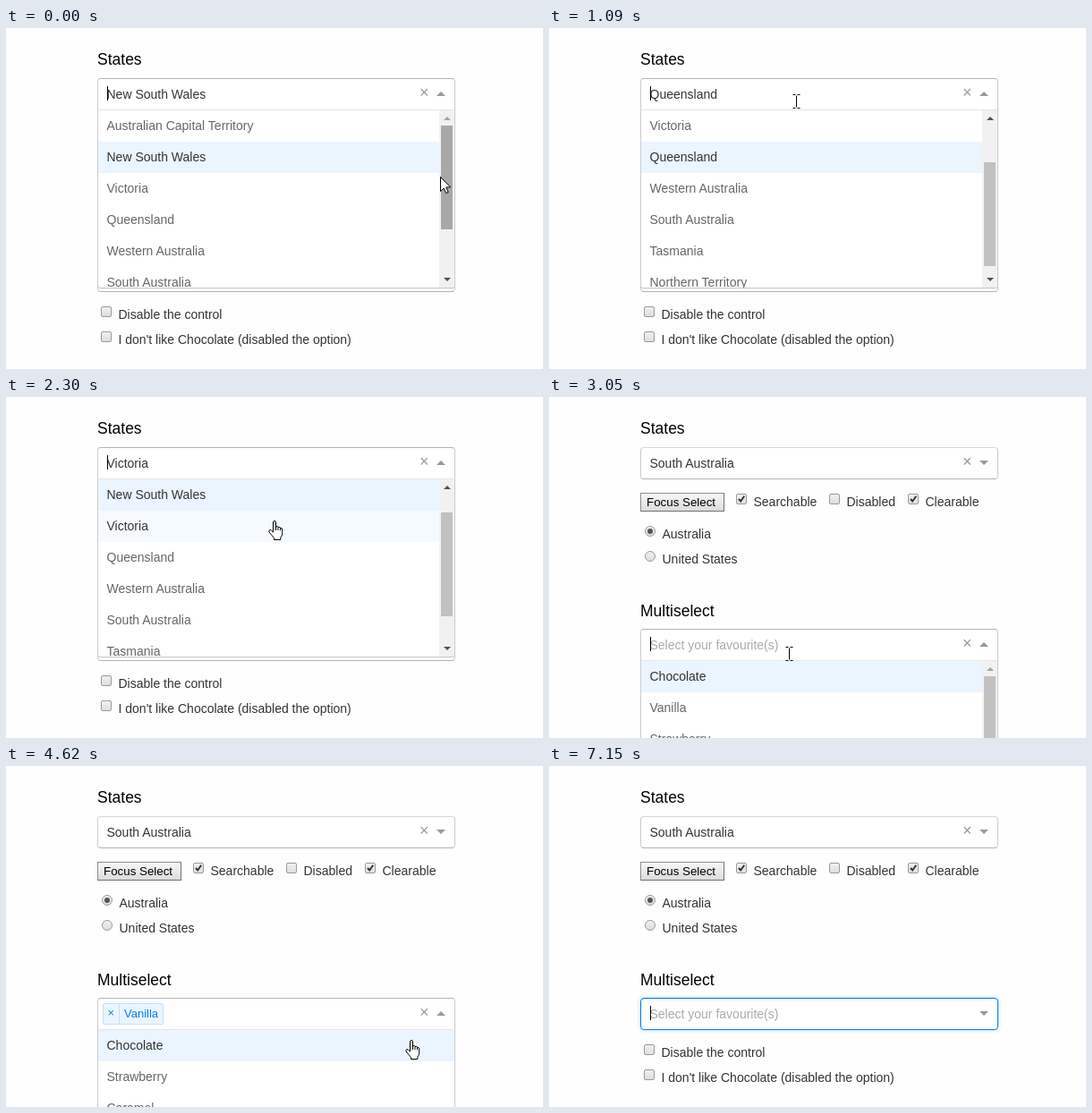
Recreate the animation shown at these times as an HTML page. Size 600 by 381 pixels, loop 7.25 s.

```html
<!DOCTYPE html>
<html lang="en">
<head>
<meta charset="utf-8">
<title>Select controls</title>
<style>
html, body { margin: 0; width: 100%; height: 100%; overflow: hidden; background: #fefefe; }
#stage { position: relative; width: 600px; height: 381px; overflow: hidden;
  font-family: "Liberation Sans", Arial, sans-serif; }
#stage div, #stage svg { position: absolute; box-sizing: border-box; }
.text { white-space: pre; }
.control { left: 102px; width: 400px; height: 36px; background: #fff; border: 1px solid;
  border-color: #d9d9d9 #ccc #b3b3b3; border-radius: 4px; }
.control.open { border-color: #b3b3b3 #ccc #d9d9d9; border-radius: 4px 4px 0 0; }
.control.focus { border-color: #007eff;
  box-shadow: inset 0 1px 2px rgba(0,0,0,.1), 0 0 5px -1px rgba(0,126,255,.5); }
.menu { left: 102px; width: 400px; height: 200px; background: #fff; border: 1px solid #ccc;
  border-top-color: #e6e6e6; border-radius: 0 0 4px 4px; overflow: hidden;
  box-shadow: 0 1px 0 rgba(0,0,0,.06); }
.row { left: 0; width: 398px; height: 35px; }
.bar { left: 381px; top: 0; width: 17px; height: 198px; background: #f1f1f1; }
.thumb { left: 2px; width: 13px; }
.caret { width: 1px; height: 16px; background: #000; }
.tag { top: 265px; height: 24px; background: #ebf5ff; border: 1px solid #c2e0ff; border-radius: 2px; }
.tag div { left: 17px; top: 0; width: 1px; height: 22px; background: #c2e0ff; }
.button { left: 102px; top: 107px; width: 94px; height: 21px; border: 1px solid;
  border-color: #8c8c8c #707070 #707070 #8c8c8c; background: linear-gradient(#f7f7f7, #dcdcdc); }
.box { width: 12px; height: 12px; border: 1px solid #9a9a9a; border-radius: 2px;
  background: linear-gradient(#f0f0f0, #dedede); }
.box.round { border-radius: 50%; }
.dot { left: 2px; top: 2px; width: 6px; height: 6px; border-radius: 50%; background: #555; }
</style>
</head>
<body>
<div id="stage"></div>
<script>
const LOOP = 7250;
const STATES = ['Australian Capital Territory', 'New South Wales', 'Victoria', 'Queensland',
  'Western Australia', 'South Australia', 'Tasmania', 'Northern Territory'];
const FLAVOURS = ['Chocolate', 'Vanilla', 'Strawberry', 'Caramel', 'Cookies and Cream', 'Peppermint'];
const TAG_WIDTH = { Vanilla: 68, Chocolate: 89 };

const SCENES = {
  start: { open: 'states', value: 1, scroll: 0 },
  queensland: { focus: 'states', value: 3 },
  second: { open: 'states', value: 3, scroll: 70 },
  victoria: { focus: 'states', value: 2 },
  third: { open: 'states', value: 2, scroll: 35 },
  south: { focus: 'states', value: 5 },
  multi: { open: 'multi', value: 5 },
  one: { open: 'multi', value: 5, tags: ['Vanilla'] },
  two: { open: 'multi', value: 5, tags: ['Vanilla', 'Chocolate'] },
  cleared: { focus: 'multi', value: 5, empty: true }
};

// time, scene, highlighted option, caret shown, pointer, x, y, hovered part
const STEPS = [
  [0, 'start', 1, 1, 'arrow', 485, 166, 'thumb'],
  [150, 'start', 2, 1, 'hand', 380, 185],
  [270, 'start', 3, 0, 'hand', 274, 223],
  [420, 'start', 3, 0, 'hand', 271, 222],
  [570, 'queensland', -1, 1, 'arrow', 277, 222],
  [700, 'queensland', -1, 1, 'arrow', 276, 168],
  [850, 'queensland', -1, 1, 'arrow', 276, 110],
  [970, 'queensland', -1, 1, 'beam', 276, 84],
  [1090, 'second', 3, 1, 'beam', 276, 82],
  [1340, 'second', 3, 1, 'hand', 263, 91],
  [1490, 'second', 2, 1, 'hand', 263, 94],
  [1610, 'victoria', -1, 1, 'arrow', 269, 101],
  [1760, 'victoria', -1, 1, 'arrow', 244, 115],
  [1880, 'victoria', -1, 1, 'arrow', 274, 106],
  [2030, 'victoria', -1, 1, 'beam', 279, 78],
  [2150, 'third', 2, 1, 'beam', 284, 64],
  [2300, 'third', 1, 1, 'hand', 293, 138],
  [2420, 'third', 4, 1, 'hand', 296, 204],
  [2540, 'third', 5, 0, 'hand', 296, 258],
  [2690, 'south', -1, 1, 'arrow', 302, 257],
  [2810, 'south', -1, 1, 'beam', 288, 276],
  [2930, 'south', -1, 1, 'beam', 270, 286],
  [3050, 'multi', 0, 1, 'beam', 268, 287],
  [3360, 'multi', 0, 1, 'hand', 269, 324],
  [3520, 'multi', 2, 1, 'hand', 276, 365],
  [3670, 'multi', 1, 0, 'hand', 274, 347],
  [3950, 'one', 2, 1, 'hand', 290, 346],
  [4070, 'one', 2, 1, 'hand', 370, 354],
  [4190, 'one', 3, 1, 'hand', 440, 366],
  [4620, 'one', 0, 0, 'hand', 446, 306],
  [4770, 'one', 0, 0, 'hand', 422, 322],
  [4890, 'one', 0, 0, 'hand', 403, 329],
  [5040, 'two', 2, 1, 'hand', 404, 329],
  [5160, 'two', 3, 1, 'hand', 458, 346],
  [5280, 'two', 3, 1, 'arrow', 507, 357],
  [5430, 'two', 3, 0, 'arrow', 506, 345],
  [5550, 'two', 2, 0, 'hand', 484, 318],
  [5670, 'two', 2, 0, 'hand', 476, 296],
  [5790, 'two', 2, 0, 'hand', 470, 273],
  [5940, 'two', 2, 0, 'hand', 480, 274],
  [6070, 'two', 2, 0, 'hand', 472, 273],
  [6220, 'two', 2, 1, 'hand', 478, 274],
  [6350, 'two', 2, 1, 'hand', 464, 274, 'clear'],
  [6490, 'cleared', -1, 1, 'beam', 472, 278],
  [6610, 'cleared', -1, 1, 'arrow', 519, 306],
  [6760, 'cleared', -1, 0, 'arrow', 535, 330],
  [6880, 'cleared', -1, 0, 'arrow', 541, 350],
  [7030, 'cleared', -1, 1, 'arrow', 541, 370],
  [7150, 'cleared', -1, 1, '', 0, 0]
];

const POINTERS = {
  arrow: '<path fill="#fff" stroke="#000" d="M.5.5V16.5L4.2 13 6.7 18.5 9.2 17.5 6.8 12H11.7Z"/>',
  hand: '<path fill="#fff" stroke="#000" d="M5.5 13V2Q5.5.5 7 .5T8.5 2V7Q11 5.8 11 7.5 13.5 6.6 13.5 8.5 15.7 8 15.7 10V14.5Q15.5 17.5 13.8 19V21.5H6.5V19.5L1 13Q.2 11 2 10.5 3.5 10.7 5.5 13Z"/>' +
    '<path fill="none" stroke="#000" d="M8.5 6.5V11M11 7.5V11M13.5 8.5V11"/>',
  beam: '<path fill="none" stroke="#000" d="M-3.5-7.5H-.5M1.5-7.5H4.5M.5-6.5V6.5M-3.5 7.5H-.5M1.5 7.5H4.5"/>'
};

const div = (cls, css, inner = '') => `<div class="${cls}" style="${css}">${inner}</div>`;
const svg = (x, y, inner) =>
  `<svg width="30" height="30" style="left:${x}px;top:${y}px;overflow:visible">${inner}</svg>`;

function text(x, baseline, words, color = '#333', size = 14) {
  const ascent = Math.round(size * .905), line = ascent + Math.round(size * .212);
  return div('text', `left:${x}px;top:${baseline - ascent}px;font-size:${size}px;line-height:${line}px;color:${color}`, words);
}

function check(cx, cy, label, on) {
  const mark = on ? svg(0, 0, '<path fill="none" stroke="#333" stroke-width="2" d="M2 5L4.2 7.5 8.2 1.8"/>') : '';
  return div('box', `left:${cx - 6}px;top:${cy - 6}px`, mark) + text(cx + 13.5, cy + 8, label);
}

function radio(cy, label, on) {
  return div('box round', `left:107px;top:${cy - 6}px`, on ? div('dot', '') : '') + text(126.5, cy + 8, label);
}

const triangle = (x, y, half, height, up, color) => svg(x, y,
  `<path fill="${color}" d="${up ? `M0 ${height}H${2 * half}L${half} 0Z` : `M0 0H${2 * half}L${half} ${height}Z`}"/>`);

function control(top, name, scene, content, clearColor) {
  const open = scene.open === name;
  const cls = open ? 'open' : scene.focus === name ? 'focus' : '';
  return div('control ' + cls, `top:${top}px`) + content +
    (clearColor ? text(462, top + 22, '×', clearColor, 18) : '') +
    triangle(481, top + 14.5, 5, 5, open, '#999');
}

function menu(top, options, focused, selected, scroll, thumbHover) {
  const rows = options.map((name, i) => {
    const color = name === focused ? '#ebf5ff' : name === selected ? '#f5faff' : '#fff';
    const ink = name === focused || name === selected ? '#333' : '#666';
    return div('row', `top:${i * 35 - scroll}px;background:${color}`, text(9.5, 22, name, ink));
  }).join('');
  const total = options.length * 35, track = 164;
  const bar = total <= 198 ? '' : div('bar', '',
    div('thumb', `top:${17 + Math.floor(scroll / total * track)}px;height:${Math.round(198 / total * track)}px;background:${thumbHover ? '#a8a8a8' : '#c1c1c1'}`) +
    triangle(4.5, 7, 4, 4, true, scroll ? '#505050' : '#a3a3a3') +
    triangle(4.5, 187, 4, 4, false, '#505050'));
  return div('menu', `top:${top}px`, rows + bar);
}

function tagList(tags) {
  let x = 108, html = '';
  for (const name of tags) {
    html += div('tag', `left:${x}px;width:${TAG_WIDTH[name]}px`, div('', '')) +
      text(x + 5.5, 280, '×', '#007eff', 13) + text(x + 24, 281, name, '#007eff', 13);
    x += TAG_WIDTH[name] + 5;
  }
  return { html, end: x };
}

function draw([, key, focus, caretOn, pointer, x, y, hover]) {
  const scene = SCENES[key], tags = scene.tags || [];
  const chips = tagList(tags);
  const onMulti = scene.open === 'multi' || scene.focus === 'multi';
  const choice = tags.length ? chips.html : text(112.5, 282, 'Select your favourite(s)', '#aaa');
  const clear = scene.empty ? '' : hover === 'clear' ? '#d0021b' : '#999';

  let html = text(102, 41, 'States', '#000', 17.5) +
    control(56, 'states', scene, text(112.5, 79, STATES[scene.value]), '#999') +
    div('button', '') + text(109, 122, 'Focus Select', '#000', 13.333) +
    check(215, 114, 'Searchable', true) + check(319, 114, 'Disabled') + check(407, 114, 'Clearable', true) +
    radio(150, 'Australia', true) + radio(178, 'United States') +
    text(102, 245, 'Multiselect', '#000', 17.5) +
    control(259, 'multi', scene, choice, clear) +
    check(112, 317, 'Disable the control') + check(112, 345, "I don't like Chocolate (disabled the option)");

  if (scene.open === 'states')
    html += menu(91, STATES, STATES[focus], STATES[scene.value], scene.scroll, hover === 'thumb');
  if (scene.open === 'multi')
    html += menu(294, FLAVOURS.filter(name => !tags.includes(name)), FLAVOURS[focus], null, 0);
  if (caretOn)
    html += div('caret', `left:${onMulti && tags.length ? chips.end : 113}px;top:${onMulti ? 268 : 65}px`);
  if (pointer) html += svg(x, y, POINTERS[pointer]);
  return html;
}

const stage = document.getElementById('stage');
const began = performance.now();
let shown = null;

function tick() {
  const time = Math.max(0, performance.now() - began) % LOOP;
  const step = STEPS.findLast(s => s[0] <= time);
  if (step !== shown) stage.innerHTML = draw(shown = step);
  requestAnimationFrame(tick);
}
tick();
</script>
</body>
</html>
```
